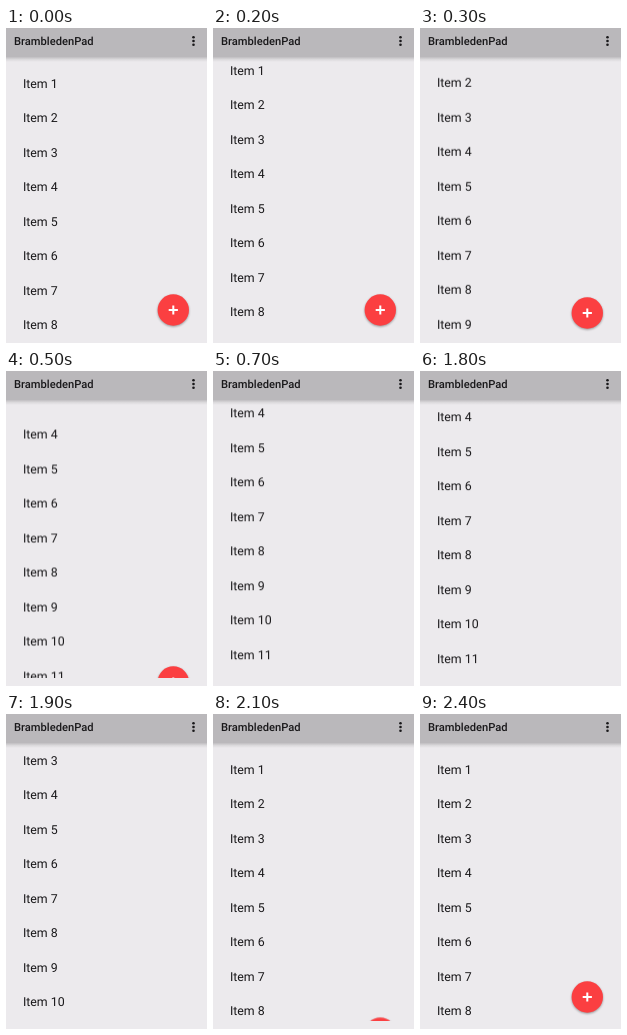
Write an HTML page that moves like this. It is 201 px wide and 315 px high and loops after 2500 ms.

```html
<!DOCTYPE html>
<html lang="en">
<head>
<meta charset="utf-8">
<title>List with floating button</title>
<style>
  html, body { margin: 0; width: 100%; height: 100%; overflow: hidden; background: #eceaed; }
  svg { display: block; width: 201px; height: 315px; }
  text { font-family: Roboto, "Open Sans", sans-serif; fill: #19181a; text-rendering: geometricPrecision; }
  .title { font-size: 11.17px; font-weight: 500; }
  #list text { font-size: 12.36px; }

  /* The screen refreshes ten times a second, so every pose is held. */
  #list, #fab { animation: scroll 2.5s step-end infinite; }
  #fab { animation-name: slide; }
  .disc { filter: drop-shadow(0 1.3px 1.2px rgba(0, 0, 0, .36)); }

  @keyframes scroll {
    0%   { transform: translateY(0); }
    4%   { transform: translateY(-2px); }
    8%   { transform: translateY(-13px); }
    12%  { transform: translateY(-35.2px); }
    16%  { transform: translateY(-68px); }
    20%  { transform: translateY(-95.5px); }
    24%  { transform: translateY(-113.5px); }
    28%  { transform: translateY(-116.8px); }
    32%  { transform: translateY(-118.7px); }
    36%  { transform: translateY(-119.4px); }
    72%  { transform: translateY(-112.9px); }
    76%  { transform: translateY(-78px); }
    80%  { transform: translateY(-26px); }
    84%, 100% { transform: translateY(0); }
  }
  @keyframes slide {
    0%   { transform: translateY(0); }
    12%  { transform: translateY(3px); }
    16%  { transform: translateY(14px); }
    20%  { transform: translateY(29px); }
    24%  { transform: translateY(42px); }
    28%  { transform: translateY(45px); }
    84%  { transform: translateY(37.3px); }
    88%  { transform: translateY(23px); }
    92%  { transform: translateY(9px); }
    96%  { transform: translateY(1px); }
    100% { transform: translateY(0); }
  }
</style>
</head>
<body>
<svg viewBox="0 0 201 315">
  <defs>
    <clipPath id="view"><rect y="37" width="201" height="270"/></clipPath>
    <linearGradient id="shade" x2="0" y2="1">
      <stop stop-color="#000" stop-opacity=".19"/>
      <stop offset=".5" stop-color="#000" stop-opacity=".07"/>
      <stop offset="1" stop-color="#000" stop-opacity="0"/>
    </linearGradient>
  </defs>
  <rect width="201" height="315" fill="#eceaed"/>
  <g clip-path="url(#view)">
    <g id="list"></g>
    <g id="fab">
      <circle class="disc" cx="167.3" cy="282" r="15.7" fill="#fb3f41"/>
      <path d="M162.7 282h9.2M167.3 277.4v9.2" stroke="#fff" stroke-width="2"/>
    </g>
  </g>
  <rect y="29" width="201" height="5" fill="url(#shade)"/>
  <rect width="201" height="29" fill="#bab8bb"/>
  <text class="title" x="8" y="17">BrambledenPad</text>
  <g fill="#19181a">
    <circle cx="187.5" cy="9.2" r="1.3"/>
    <circle cx="187.5" cy="13" r="1.3"/>
    <circle cx="187.5" cy="16.8" r="1.3"/>
  </g>
</svg>
<script>
  const list = document.getElementById('list');
  for (let i = 0; i < 11; i++) {
    const row = document.createElementNS('http://www.w3.org/2000/svg', 'text');
    row.setAttribute('x', 16.9);
    row.setAttribute('y', 59.9 + 34.5 * i);
    row.textContent = `Item ${i + 1}`;
    list.append(row);
  }
</script>
</body>
</html>
```
